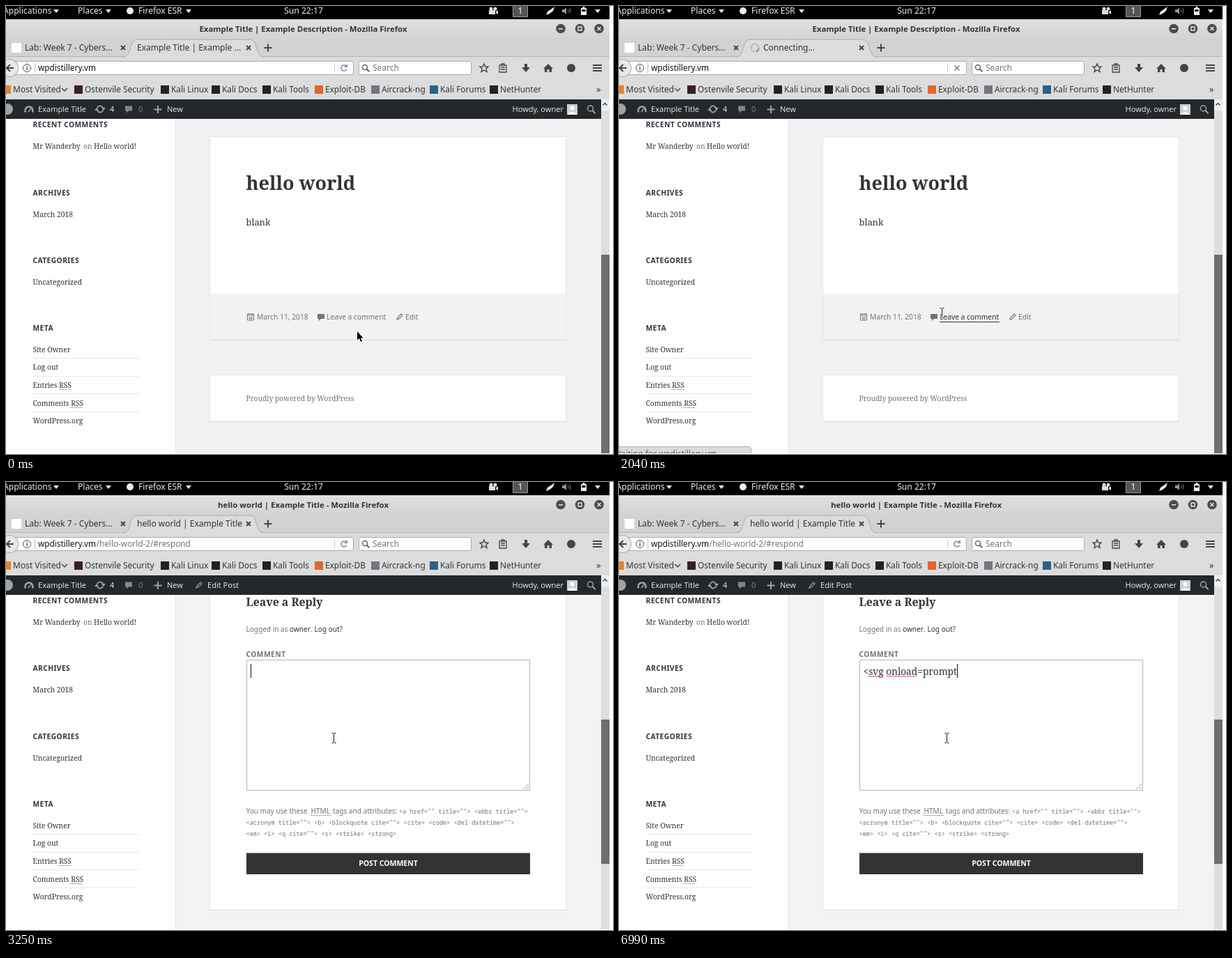
An HTML page with a canvas that plays this animation: 871 by 643 pixels, repeating every 8 s.

```html
<!DOCTYPE html>
<html lang="en">
<head>
<meta charset="utf-8">
<title>Comment form</title>
<style>
html, body { margin: 0; width: 100%; height: 100%; overflow: hidden; background: #fff; }
canvas { display: block; }
</style>
</head>
<body>
<canvas id="stage" width="871" height="643"></canvas>
<script>
const c = document.getElementById('stage').getContext('2d');
const LOOP = 8000;
const SANS = '"Noto Sans", sans-serif', OPEN = '"Open Sans", sans-serif';
const SERIF = '"Noto Serif", serif', MONO = '"Noto Sans Mono", monospace';
const SMALL = 10.28, NOTE = 10.05, INK = '#333', GREY = '#737373', UI = '#2e3436';
const COMMENT = '<svg onload=prompt';

// time, shape, x, y
const POINTER = [
  [0, 'arrow', 504, 467], [280, 'arrow', 503.5, 466.5], [530, 'arrow', 490, 419],
  [650, 'arrow', 471, 420], [920, 'arrow', 471, 430], [1040, 'arrow', 471, 434],
  [1190, 'hand', 467, 441], [1320, 'hand', 469, 444], [1890, 'hand', 467, 439],
  [2040, 'beam', 463, 440], [2310, 'beam', 463, 430], [2700, 'beam', 463, 418],
  [2860, 'beam', 463, 395], [3010, 'beam', 467, 377], [3130, 'beam', 470, 367]
];
// time, typed characters
const TYPED = [
  [0, 0], [3900, 1], [4330, 2], [4480, 3], [4610, 4], [4750, 5], [5160, 7], [5300, 8],
  [5550, 10], [5700, 11], [6290, 12], [6450, 13], [6570, 14], [6710, 15], [6870, 16], [6990, 18]
];
const held = (list, t) => list.filter(k => k[0] <= t).pop();

function text(s, x, y, size, color, font = SANS, weight = 400, align = 'left', spacing = 0) {
  c.font = `${weight} ${size}px ${font}`;
  c.fillStyle = color;
  c.textAlign = align;
  c.letterSpacing = spacing + 'px';
  c.fillText(s, x, y);
}
function box(x, y, w, h, color) {
  c.fillStyle = color;
  c.fillRect(x, y, w, h);
}
function frame(x, y, w, h, fill, stroke, r = 0) {
  c.beginPath();
  c.roundRect(x + .5, y + .5, w - 1, h - 1, r);
  c.fillStyle = fill;
  c.fill();
  c.strokeStyle = stroke;
  c.lineWidth = 1;
  c.stroke();
}
function disc(x, y, r, color) {
  c.beginPath();
  c.arc(x, y, r, 0, 7);
  c.fillStyle = color;
  c.fill();
}
function arc(x, y, r, color, width = 1.5, from = 0, to = 2 * Math.PI) {
  c.beginPath();
  c.arc(x, y, r, from, to);
  c.strokeStyle = color;
  c.lineWidth = width;
  c.stroke();
}
// SVG path data placed at x, y; filled, or stroked when a width is given
function shape(d, x, y, color, width) {
  const p = new Path2D(d);
  c.save();
  c.translate(x, y);
  c.fillStyle = c.strokeStyle = color;
  if (width) { c.lineWidth = width; c.stroke(p); } else c.fill(p);
  c.restore();
}
const cross = (x, y, r, color, w = 2) => shape(`M${-r} ${-r}L${r} ${r}M${r} ${-r}L${-r} ${r}`, x, y, color, w);
const plus = (x, y, r, color, w = 2) => shape(`M${-r} 0H${r}M0 ${-r}V${r}`, x, y, color, w);
const drop = (x, y) => shape('M-4 -2H4L0 3Z', x, y, '#eee');
const bubble = (x, y, color) => shape('M-5 -4H5V3H0L-3 6V3H-5Z', x, y, color);
const pencil = (x, y, color) => shape('M-4 4L-3 1L2 -4L4 -2L-1 3ZM-4 4L-1 3', x, y, color, 1.2);
function lens(x, y, r, color) {
  arc(x, y, r, color);
  shape(`M${r * .7} ${r * .7}L${r * 1.8} ${r * 1.8}`, x, y, color, 2);
}
function reload(x, y, r, color) {
  arc(x, y, r, color, 1.6, .4, 5.4);
  shape('M0 0V-5L-5 0Z', x + r + 1, y - 1, color);
}
function dotted(x, y, w) {
  for (let i = 0; i < w; i += 2) box(x + i, y, 1, 1, '#666');
}

function desktop() {
  box(0, 0, 866, 19, '#000');
  text('Applications', -4, 11, 12.1, '#eee');
  text('Places', 103, 11, 12.1, '#eee');
  text('Firefox ESR', 190, 11, 12.1, '#eee');
  text('Sun 22:17', 427, 11, 12.1, '#eee', SANS, 400, 'center');
  [72, 147, 262, 849].forEach(x => drop(x, 7));
  disc(178, 7, 5, '#eee');
  disc(696, 4, 2.5, '#ddd');
  disc(702, 4, 2.5, '#ddd');
  shape('M-6 0H3V6H-6ZM4 2L7 0V6L4 4Z', 699, 6, '#ddd');
  frame(727, -2, 22, 18, '#555', '#999');
  text('1', 738, 11, 12, '#fff', SANS, 400, 'center');
  shape('M-6 6L-4 1L2 -3L6 -6L4 0L-1 4Z', 781, 7, '#eee');
  shape('M-6 -2H-3L0 -5V5L-3 2H-6Z', 804, 7, '#999');
  [3, 6].forEach(r => arc(804, 7, r, '#888', 1, -.8, .8));
  shape('M-4 -4H-1.5V-6H1.5V-4H4V6H-4ZM-2.5 -2V1H2.5V-2Z', 829, 7, '#eee');
}

function spinner(t, blue) {
  arc(195, 60, 5.5, blue ? '#b9d9ee' : '#bbb', 2);
  const a = Math.floor(t / 140) * .9;
  arc(195, 60, 5.5, blue ? '#3a9fe0' : '#888', 2, a, a + (blue ? 3.6 : 1.2));
}

function browser(t) {
  const moved = t >= 2170, loading = t >= 1590 && t < 2700;
  const bar = c.createLinearGradient(0, 19, 0, 47);
  bar.addColorStop(0, '#e0e0e0');
  bar.addColorStop(1, '#d3d3d3');
  box(0, 19, 866, 28, bar);
  text(moved ? 'hello world | Example Title - Mozilla Firefox' : 'Example Title | Example Description - Mozilla Firefox',
    426.5, 37, 11.4, UI, SANS, 700, 'center');
  [796, 823.5, 851].forEach(x => disc(x, 32.5, 6.8, '#4c4c4c'));
  box(793, 32, 6, 1.5, '#eee');
  shape('M-2.5 -2.5H2.5V2.5H-2.5Z', 823.5, 32.5, '#eee', 1.3);
  cross(851, 32.5, 2.5, '#eee', 1.4);

  box(0, 47, 866, 26, '#d2d2d2');
  box(0, 73, 866, 61, '#dcdcdc');
  box(0, 72, 866, 1, '#b4b4b4');
  const tab = 'M168 73C181 73 176 48 188 48H350C362 48 357 73 370 73';
  shape(tab, 0, 0, '#dcdcdc');
  shape(tab, 0, 0, '#aaa', 1);
  box(8, 53, 14, 14, '#fff');
  text('Lab: Week 7 - Cybers...', 27, 64, 12, UI);
  [168, 348].forEach(x => cross(x, 60, 3, '#444'));
  plus(376, 60, 5.5, '#444');
  if (loading) {
    spinner(t, moved);
    text(moved ? 'hello world | Example...' : 'Connecting...', 207, 64, 12, UI);
  } else {
    text(moved ? 'hello world | Example Title' : 'Example Title | Example ...', 188, 64, 12, UI);
  }

  frame(-4, 79, 503, 20, '#fdfdfd', '#aaa', 2);
  disc(5, 89, 13, '#aaa');
  disc(5, 89, 12, '#e8e8e8');
  shape('M5 0H-5M0 -5L-5 0L0 5', 6, 89, '#444', 2);
  arc(30, 89, 5.5, '#555', 1);
  box(29.3, 88, 1.5, 4, '#555');
  box(29.3, 85.5, 1.5, 1.5, '#555');
  box(41, 82, 1, 14, '#bbb');
  box(471, 82, 1, 14, '#ccc');
  text('wpdistillery.vm', 46, 93, 11.8, '#111');
  if (moved) text('/hello-world-2/#respond', 129.5, 93, 11.8, '#777');
  if (loading) cross(485, 89, 3.5, '#6d8196', 1.5);
  else reload(485, 89, 4, '#7890a8');
  frame(506, 79, 162, 20, '#fdfdfd', '#aaa', 2);
  lens(515, 88, 3.5, '#666');
  text('Search', 526, 93, 12, '#777');
  shape('M0 -6L1.8 -2L6 -1.8L2.8 1.2L4 5.5L0 3L-4 5.5L-2.8 1.2L-6 -1.8L-1.8 -2Z', 686, 89, '#444', 1.4);
  shape('M-5 -4H5V6H-5ZM-2 -4V-6H2V-4M-3 -1H3M-3 2H3', 713, 89, '#444', 1.3);
  shape('M-2 -6H2V-1H6L0 6L-6 -1H-2Z', 746, 89, '#444');
  shape('M0 -6L7 1H5V6H1.5V2H-1.5V6H-5V1H-7Z', 778, 89, '#444');
  disc(811, 89, 6, '#444');
  [84, 88, 92].forEach(y => box(842, y, 13, 2, '#444'));

  box(0, 114, 7, 12, '#e5842b');
  text('Most Visited', 10, 124, 12, UI);
  shape('M-4 -2L0 2L4 -2', 84, 120, '#444', 1.5);
  [['Ostenvile Security', 113, '#3a2020'], ['Kali Linux', 237, '#222'], ['Kali Docs', 310, '#222'],
   ['Kali Tools', 383, '#222'], ['Exploit-DB', 458, '#e2662a'], ['Aircrack-ng', 539, '#70777e'],
   ['Kali Forums', 623, '#27618c'], ['NetHunter', 709, '#222']].forEach(([name, x, color]) => {
    box(x - 15, 114, 12, 12, color);
    text(name, x, 124, 11.85, UI);
  });
  text('»', 847, 124, 13, UI);
}

function toolbar(t) {
  const pale = '#9ea3a8', light = '#eee';
  box(0, 134, 854, 28, '#23282d');
  disc(2, 148, 8, pale);
  arc(33, 150, 5.5, pale, 2.5, Math.PI * .85, Math.PI * 2.15);
  shape('M-1 1L3 -4', 33, 151, pale, 1.6);
  text('Example Title', 46, 152, 11.1, light, OPEN);
  arc(135, 148, 4.5, pale, 1.8, .3, 2.7);
  arc(135, 148, 4.5, pale, 1.8, 3.4, 5.9);
  shape('M2 -2H8L5 2ZM-8 2H-2L-5 -2Z', 135, 148, pale);
  text('4', 149, 152, 11.1, light, OPEN);
  bubble(176, 147.5, '#82878c');
  text('0', 190, 152, 11.1, '#82878c', OPEN);
  plus(218, 148.5, 5.5, pale);
  text('New', 231, 152, 11.1, light, OPEN);
  if (t >= 2580) {
    pencil(277, 148, pale);
    text('Edit Post', 289, 152, 11.1, light, OPEN);
  }
  text('Howdy, owner', 800, 152, 11.1, light, OPEN, 400, 'right');
  box(805, 141, 15, 15, '#d0d0d0');
  disc(812.5, 146.5, 3, '#fff');
  shape('M-6 6C-6 1 6 1 6 6Z', 812.5, 150, '#fff');
  lens(838.5, 147, 4, pale);
}

function sidebar(shift) {
  box(0, 162, 243, 480, '#fefefe');
  box(243, 162, 1, 480, '#e2e2e2');
  [['RECENT COMMENTS', 174], ['ARCHIVES', 272 - shift], ['CATEGORIES', 369], ['META', 466]]
    .forEach(([s, y]) => text(s, 38.5, y, SMALL, INK, SANS, 700, 'left', .41));
  text('Mr Wanderby', 38.5, 205, SMALL, INK, SERIF);
  text('on', 111, 205, SMALL, GREY, SERIF);
  text('Hello world!', 126, 205, SMALL, INK, SERIF);
  [['March 2018', 303 - shift], ['Uncategorized', 400], ['Site Owner', 497], ['Log out', 522],
   ['Entries RSS', 548], ['Comments RSS', 574], ['WordPress.org', 599]]
    .forEach(([s, y]) => text(s, 38.5, y, SMALL, INK, SERIF));
  dotted(76, 550, 18);
  dotted(92, 576, 18);
  [505, 531, 556, 582].forEach(y => box(39, y, 153, 1, '#e8e8e8'));
}

function card(y, h) {
  box(292, y - 1, 512, h + 2, '#e6e6e6');
  box(293, y + h, 511, 1, '#d8d8d8');
  box(293, y, 510, h, '#fefefe');
}

function post(t) {
  card(188, 291);
  box(293, 413, 510, 66, '#f2f2f2');
  text('hello world', 344.5, 264, 27, INK, SERIF, 700);
  text('blank', 344.5, 315, 12.86, INK, SERIF);
  shape('M-4.5 -4H4.5V5H-4.5ZM-4.5 -2H4.5M-2.5 -5V-3M2.5 -5V-3M-2.5 1H3M-2.5 3H3', 351, 446, GREY, 1);
  text('March 11, 2018', 360, 450, SMALL, GREY);
  bubble(452, 446, GREY);
  const hover = t >= 1190;
  text('Leave a comment', 460, 450, SMALL, hover ? INK : GREY);
  if (hover) box(460, 453, 86, 1, INK);
  pencil(565, 446, GREY);
  text('Edit', 573, 450, SMALL, GREY);
  card(530, 66);
  text('Proudly powered by WordPress', 344.5, 567, SMALL, GREY, SERIF);
}

function squiggle(from, to) {
  let d = `M${from} 280`;
  for (let x = from + 2, i = 0; x <= to; x += 2, i++) d += `L${x} ${i % 2 ? 280 : 278}`;
  shape(d, 0, 0, '#e33', 1);
}

function reply(t) {
  card(162, 452);
  text('Leave a Reply', 344.5, 178, 15.75, INK, SERIF, 700);
  text('Logged in as', 344.5, 215, NOTE, GREY);
  text('owner', 407, 215, NOTE, INK);
  text('.', 437, 215, NOTE, GREY);
  text('Log out?', 442.5, 215, NOTE, INK);
  text('COMMENT', 344.5, 251, SMALL, GREY, SANS, 700, 'left', .41);
  const focus = t >= 3010;
  frame(345, 255, 407, 188, focus ? '#fefefe' : '#f8f8f8', focus ? '#b5b5b5' : '#e4e4e4');
  shape('M0 8L8 0M4 8L8 4', 742, 433, '#aaa', 1);
  if (focus) {
    const n = held(TYPED, t)[1], left = 350.5;
    text(COMMENT.slice(0, n), left, 277, 13.71, INK, SERIF);
    const edge = k => left + c.measureText(COMMENT.slice(0, k)).width;
    box(Math.round(edge(n)), 261, 1, 20, '#111');
    if (n >= 5) squiggle(edge(1), edge(4));
    if (n >= 12) squiggle(edge(5), edge(11));
  }
  text('You may use these', 344.5, 476, NOTE, GREY);
  text('HTML', 437.5, 476, NOTE, GREY);
  dotted(437, 478, 29);
  text('tags and attributes:', 469, 476, NOTE, GREY);
  text('<a href="" title=""> <abbr title="">', 564, 476, 8.57, GREY, MONO);
  text('<acronym title=""> <b> <blockquote cite=""> <cite> <code> <del datetime="">', 344.5, 492, 8.57, GREY, MONO);
  text('<em> <i> <q cite=""> <s> <strike> <strong>', 344.5, 508, 8.57, GREY, MONO);
  box(345, 532.5, 407, 30.5, INK);
  text('POST COMMENT', 548.5, 551, 10.5, '#fff', SANS, 700, 'center');
}

function scrollbar(loaded) {
  box(854, 134, 12, 508, '#dedede');
  box(854, 134, 12, 16, '#eee');
  shape('M-3 1.5L0 -1.5L3 1.5', 859.5, 141, '#444', 1.5);
  box(854, loaded ? 341 : 357, 12, loaded ? 207 : 285, '#6e6e6e');
}

function status(t) {
  if (t < 1590 || t >= 2700) return;
  const [label, w] = t < 1750 ? ['wpdistillery.vm/hello-world-2/#respond', 215]
    : t < 2170 ? ['Waiting for wpdistillery.vm…', 190]
    : ['Transferring data from wpdistillery.vm…', 265];
  frame(-5, 632, w + 5, 16, '#dcdcdc', '#aaa', 3);
  text(label, -8, 647, 11.9, '#555');
}

function pointer(t) {
  const [, kind, x, y] = held(POINTER, t);
  if (kind === 'beam') {
    const d = 'M-3 -7H-1L0 -6L1 -7H3M0 -6V6M-3 7H-1L0 6L1 7H3';
    shape(d, x + .5, y + .5, '#fff', 3);
    shape(d, x + .5, y + .5, '#111', 1);
    return;
  }
  const d = kind === 'arrow' ? 'M0 0V12.5L3 10L5 15L7 14L5 9.5H8.5Z'
    : 'M3 0H5V5L10 6.5V11L8.5 14H3L0 9V7L3 8Z';
  shape(d, x, y, '#fff', 2);
  shape(d, x, y, '#000');
}

function draw(now) {
  const t = now % LOOP, loaded = t >= 2580;
  box(0, 0, 871, 643, '#fff');
  c.save();
  c.beginPath();
  c.rect(0, 0, 866, 642);
  c.clip();
  box(0, 162, 866, 480, loaded ? '#f3f3f3' : '#f1f1f1');
  sidebar(loaded ? 1 : 0);
  (loaded ? reply : post)(t);
  toolbar(t);
  scrollbar(loaded);
  browser(t);
  desktop();
  status(t);
  pointer(t);
  c.restore();
  requestAnimationFrame(draw);
}
requestAnimationFrame(draw);
</script>
</body>
</html>
```
